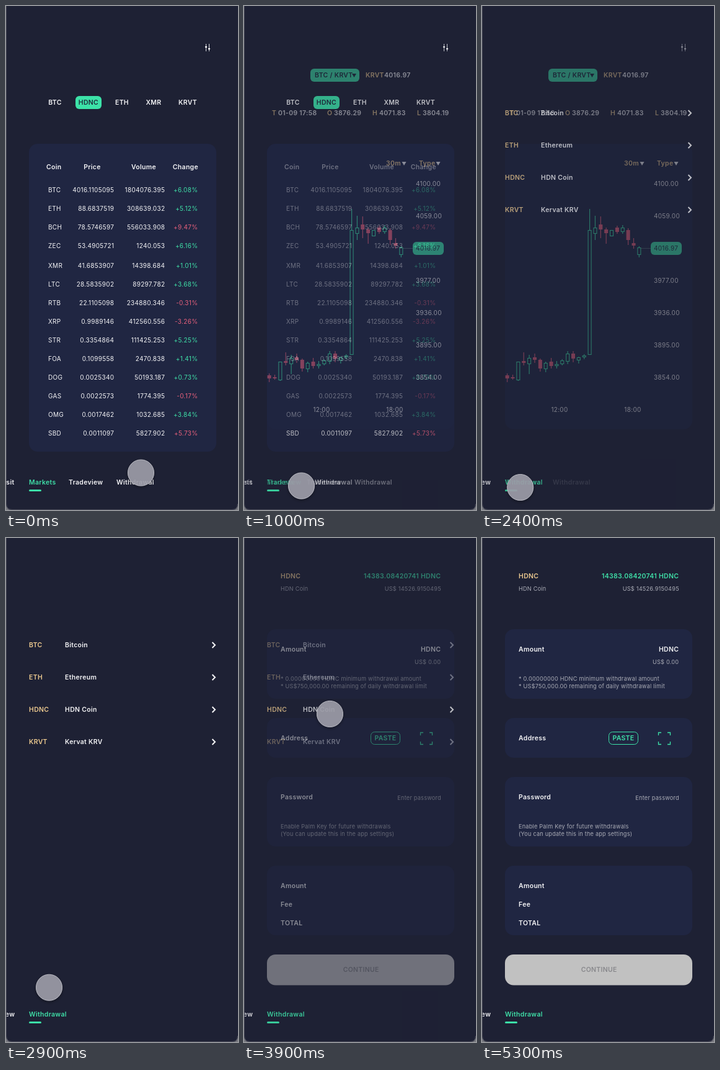
Write an HTML page that moves like this. It is 374 px wide and 812 px high and loops after 5.4 s.

```html
<!DOCTYPE html>
<html lang="en">
<head>
<meta charset="utf-8">
<title>Coin exchange</title>
<style>
html, body { margin: 0; width: 100%; height: 100%; overflow: hidden; background: #1e2134; }
svg { display: block; width: 374px; height: 812px; }
text { font: 400 10px Inter, sans-serif; letter-spacing: .3px; fill: #f4f4f6; }
.b { font-weight: 600; font-size: 10.5px; }
.s { font-size: 9.2px; letter-spacing: .2px; fill: #a9abb5; }
.gold { fill: #ecc98f; }
.up { fill: #3fe0a8; }
.down { fill: #e8607c; }
.dark { fill: #1d2b3b; }
.off { fill: #88888c; }
</style>
</head>
<body>
<svg id="stage" viewBox="0 0 374 812"></svg>
<script>
const LOOP = 5400, STEP = 100, FADE = 600;
const BG = '#1e2134', CARD = '#202642', GREEN = '#3ce2a8', RED = '#e8607c';

const text = (x, y, s, cls = '', anchor = 'start') =>
  `<text x="${x}" y="${y}" class="${cls}" text-anchor="${anchor}">${s}</text>`;
const box = (x, y, w, h, r, fill, extra = '') =>
  `<rect x="${x}" y="${y}" width="${w}" height="${h}" rx="${r}" fill="${fill}" ${extra}/>`;
const path = (d, stroke, w = 1) =>
  `<path d="${d}" fill="none" stroke="${stroke}" stroke-width="${w}"/>`;
const card = (top, bottom) => box(37, top, 302, bottom - top, 14, CARD);
const arrow = (x, y, fill) => `<path d="M${x} ${y}h7l-3.5 6z" fill="${fill}"/>`;

const icon = path('M322.5 61v12M327.5 61v12', '#d5d6dc') +
  path('M321 66h3M326 69h3', '#fff', 2);

// Bottom bar: the word cut by the left edge, then [x, label] items.
const nav = (cut, end, items) => box(0, 730, 313, 81, 0, BG) +
  text(end, 771, cut, 'b', 'end') +
  items.map(([x, s], i) => text(x, 771, s, i ? 'b' : 'b up')).join('') +
  box(37, 779, 20, 3, 1.5, GREEN);

function markets() {
  const tabs = [[79, 'BTC'], [133, 'HDNC'], [187, 'ETH'], [238, 'XMR'], [293, 'KRVT']];
  const rows = `BTC 4016.1105095 1804076.395 +6.08%
ETH 88.6837519 308639.032 +5.12%
BCH 78.5746597 556033.908 +9.47% down
ZEC 53.4905721 1240.053 +6.16%
XMR 41.6853907 14398.684 +1.01%
LTC 28.5835902 89297.782 +3.68%
RTB 22.1105098 234880.346 -0.31% down
XRP 0.9989146 412560.556 -3.26% down
STR 0.3354864 111425.253 +5.25%
FOA 0.1099558 2470.838 +1.41%
DOG 0.0025340 50193.187 +0.73%
GAS 0.0022573 1774.395 -0.17% down
OMG 0.0017462 1032.685 +3.84%
SBD 0.0011097 5827.902 +5.73% down`.split('\n');
  return icon + box(112, 145, 42, 21, 6, GREEN) +
    tabs.map(([x, s], i) => text(x, 159, s, i == 1 ? 'b dark' : 'b', 'middle')).join('') +
    card(222, 718) +
    text(65, 263, 'Coin', 'b') + text(139, 263, 'Price', 'b', 'middle') +
    text(222, 263, 'Volume', 'b', 'middle') + text(310, 263, 'Change', 'b', 'end') +
    rows.map((row, i) => {
      const [coin, price, volume, change, dir = 'up'] = row.split(' ');
      const y = 300 + 30 * i + (i > 3 ? 2 : 0);
      return text(68, y, coin) + text(174.3, y, price, '', 'end') +
        text(256.3, y, volume, '', 'end') + text(309.3, y, change, dir, 'end');
    }).join('') +
    nav('Deposit', 13.5, [[37, 'Markets'], [101, 'Tradeview'], [178, 'Withdrawal']]);
}

// Each candle: high, body top, body bottom, low.
const candles = [
  [592, 595, 600, 606], [594, 598, 600, 602], [573, 573, 603, 604], [558, 572, 575, 579],
  [562, 567, 577, 593], [560, 566, 570, 575], [568, 570, 584, 589], [573, 575, 585, 590],
  [567, 573, 580, 584], [572, 577, 580, 584], [569, 571, 577, 579], [556, 560, 573, 577],
  [556, 560, 568, 574], [565, 566, 571, 576], [561, 563, 566, 569], [327, 361, 562, 562],
  [338, 357, 367, 377], [339, 352, 360, 374], [357, 360, 366, 383], [361, 361, 371, 371],
  [354, 357, 364, 367], [353, 357, 364, 367], [358, 361, 377, 385], [374, 382, 386, 391],
  [387, 389, 401, 405]];
const colours = 'rrgrgrrgrgggrggggrrgrgrrg';

function candle([high, top, bottom, low], i) {
  const x = 40.7 + 8.86 * i, red = colours[i] == 'r', c = red ? RED : GREEN;
  return path(`M${x} ${high}V${top}M${x} ${bottom}V${low}`, c, 1.2) +
    (red ? box(x - 3, top, 6, bottom - top, 0, RED)
      : box(x - 2.5, top + .5, 5, bottom - top - 1 || 1, 0, 'none', `stroke="${GREEN}" stroke-width="1.1"`));
}

function trade() {
  const stats = [[45, 55, 'T', '01-09 17:58'], [134, 145, 'O', '3876.29'],
    [207, 218, 'H', '4071.83'], [279, 288, 'L', '3804.19']];
  const prices = [4100, 4059, 0, 3977, 3936, 3895, 3854];
  return icon + box(107, 101, 79, 21, 6, GREEN) + text(114, 115, 'BTC / KRVT', 'b dark') +
    arrow(174, 109, '#1d2b3b') + text(196, 115, 'KRVT', 'b gold') + text(226, 115, '4016.97', 'b') +
    stats.map(([x, x2, k, v]) => text(x, 176, k, 'b gold') + text(x2, 176, v, 'b')).join('') +
    card(222, 682) +
    text(229, 257, '30m', 'b gold') + arrow(254.5, 251, '#f4f4f6') +
    text(282, 257, 'Type', 'b gold') + arrow(309.5, 251, '#f4f4f6') +
    prices.map((p, i) => p ? text(277, 290 + 52 * i, p + '.00') : '').join('') +
    path('M256 390.5H272', '#50616f') + candles.map(candle).join('') +
    box(272, 380, 50, 21, 6, GREEN) + text(277, 394, '4016.97', 'dark') +
    text(125, 654, '12:00', '', 'middle') + text(243, 654, '18:00', '', 'middle') +
    nav('Markets', 14.3, [[37, 'Tradeview'], [114, 'Withdrawal']]);
}

const lastNav = nav('Tradeview', 14.3, [[37, 'Withdrawal']]);

function coins() {
  const list = [['BTC', 'Bitcoin'], ['ETH', 'Ethereum'], ['HDNC', 'HDN Coin'], ['KRVT', 'Kervat KRV']];
  return list.map(([code, name], i) => {
    const y = 176 + 52 * i;
    return text(37, y, code, 'b gold') + text(95, y, name, 'b') +
      path(`M332.5 ${y - 8}l4.5 4.5l-4.5 4.5`, '#f4f4f6', 2);
  }).join('') + lastNav;
}

function withdraw() {
  return text(59, 65, 'HDNC', 'b gold') + text(317.3, 65, '14383.08420741 HDNC', 'b up', 'end') +
    text(59, 85, 'HDN Coin', 's') + text(317.8, 85, 'US$ 14526.9150495', 's', 'end') +
    card(147, 259) + text(59, 183, 'Amount', 'b') + text(317.3, 183, 'HDNC', 'b', 'end') +
    text(317.3, 203, 'US$ 0.00', 's', 'end') +
    text(59, 230, '* 0.00000000 HDNC minimum withdrawal amount', 's') +
    text(59, 242, '* US$750,000.00 remaining of daily withdrawal limit', 's') +
    card(290, 354) + text(59, 326, 'Address', 'b') +
    box(204.5, 312.5, 47, 20, 6, 'none', `stroke="${GREEN}"`) + text(228, 326, 'PASTE', 'b up', 'middle') +
    path('M284.5 318v-4.5h4.5M299 313.5h4.5v4.5M303.5 328v4.5h-4.5M289 332.5h-4.5v-4.5', GREEN, 1.3) +
    card(385, 497) + text(59, 421, 'Password', 'b') + text(317.8, 422, 'Enter password', 's', 'end') +
    text(59, 468, 'Enable Palm Key for future withdrawals', 's') +
    text(59, 480, '(You can update this in the app settings)', 's') +
    card(528, 640) +
    ['Amount', 'Fee', 'TOTAL'].map((s, i) => text(59, 564 + 30 * i, s, 'b')).join('') +
    box(37, 671, 302, 49.5, 14, '#c1c1c1') + text(188.7, 699, 'CONTINUE', 'b off', 'middle') + lastNav;
}

const stage = document.getElementById('stage');
stage.innerHTML = `<defs>
  <radialGradient id="press"><stop offset="0" stop-color="#a0a0aa" stop-opacity=".05"/>
    <stop offset="1" stop-color="#a8a8b0" stop-opacity=".8"/></radialGradient>
  <filter id="shade" x="-50%" y="-50%" width="200%" height="200%">
    <feDropShadow dx="0" dy="2" stdDeviation="2.5" flood-color="#000" flood-opacity=".4"/></filter></defs>` +
  box(0, 0, 374, 812, 0, BG) +
  [markets, trade, coins, withdraw].map(page => `<g class="page">${page()}</g>`).join('') +
  `<g id="finger"><circle id="rest" r="21" fill="#a0a0ab" fill-opacity=".88" stroke="#bcbcc4" filter="url(#shade)"/>
   <circle id="down" r="21" fill="url(#press)" stroke="#a4a5ae"/></g>` +
  path('M.5 0V802Q.5 811.5 10 811.5H364Q373.5 811.5 373.5 802', '#4a4c5a') +
  '<path d="M0 802Q0 812 10 812H0zM374 802Q374 812 364 812H374z" fill="#77787f"/>';

const pages = [...stage.querySelectorAll('.page')];
const [finger, rest, down] = ['finger', 'rest', 'down'].map(id => document.getElementById(id));
const starts = [-FADE, 700, 1950, 3600, LOOP];
const taps = [700, 1900, 3600];
// Pointer stops: time, x, y.
const route = [[0, 217.5, 752], [600, 109, 772], [1000, 92.5, 773], [1500, 87.5, 773],
  [1900, 62, 775.5], [2750, 61.5, 775.5], [3500, 138.5, 282], [3700, 138.5, 282.5],
  [4500, 138.5, 288.5], [5000, 138.5, -40], [LOOP, 138.5, -40]];

const clamp = v => Math.max(0, Math.min(1, v));
const ramp = (t, start) => clamp((t - start) / FADE);

function pointer(t) {
  const i = route.findIndex(k => k[0] > t), a = route[i - 1], b = route[i];
  const u = (t - a[0]) / (b[0] - a[0]), e = u * u * (3 - 2 * u);
  return [1, 2].map(n => a[n] + (b[n] - a[n]) * e);
}

function draw(t) {
  pages.forEach((page, i) => {
    const o = ramp(t, starts[i]) * (1 - ramp(t, starts[i + 1]) ** 2);
    page.setAttribute('opacity', o);
    page.style.display = o ? '' : 'none';
  });
  const [x, y] = pointer(t);
  const k = Math.max(...taps.map(p => clamp(1 - Math.abs(t - p) / 250)));
  finger.setAttribute('transform', `translate(${x} ${y}) scale(${1 - .05 * k})`);
  rest.setAttribute('opacity', 1 - k);
  down.setAttribute('opacity', k);
}

const begin = performance.now();
function tick() {
  const t = (performance.now() - begin) % LOOP;
  draw(Math.floor(t / STEP) * STEP);
  requestAnimationFrame(tick);
}
draw(0);
requestAnimationFrame(tick);
</script>
</body>
</html>
```
